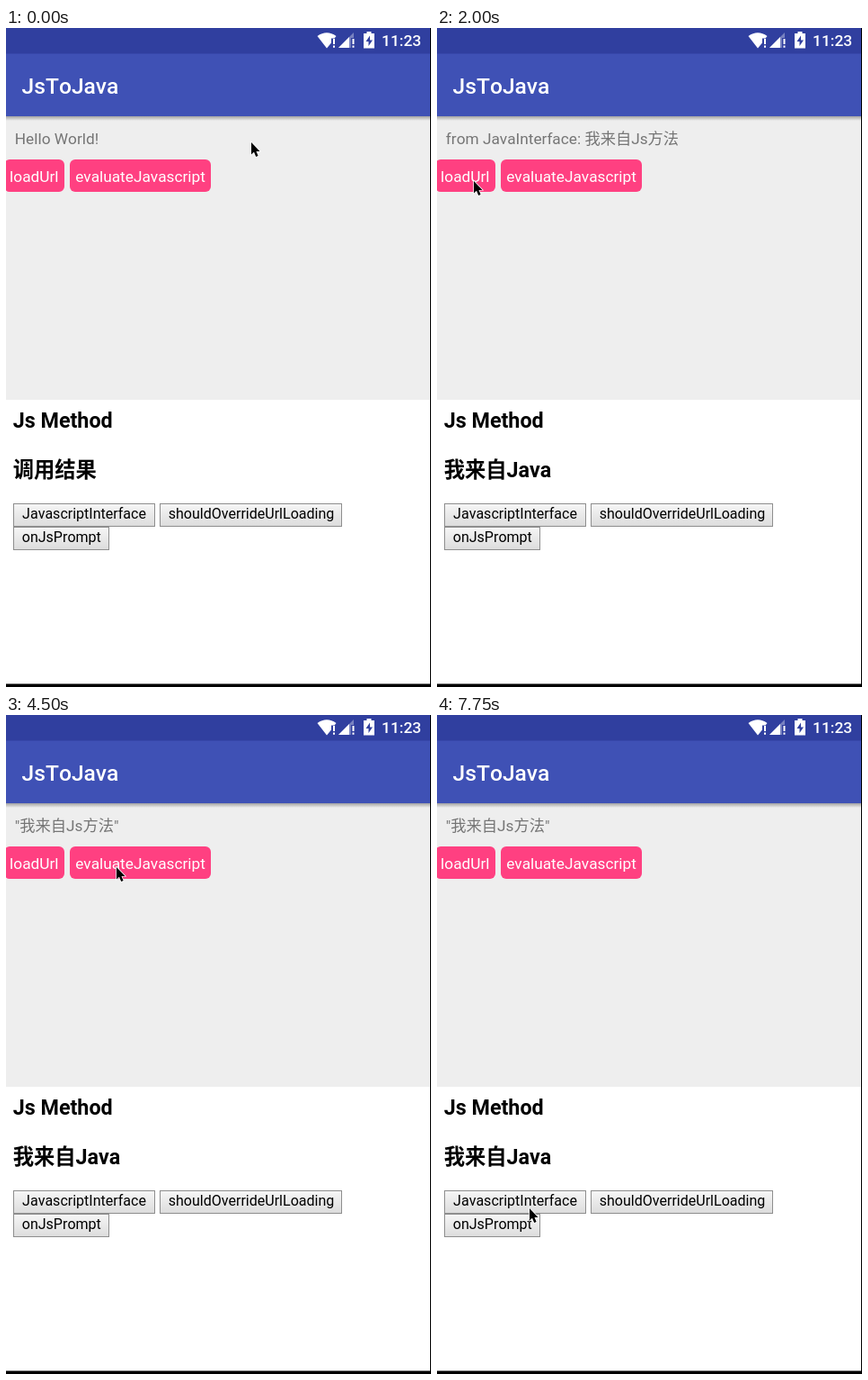
An HTML page that plays this animation: 473x732 px, repeating every 8 s.

```html
<!DOCTYPE html>
<html lang="zh-CN">
<head>
<meta charset="utf-8">
<title>JsToJava</title>
<style>
  html, body { margin: 0; width: 100%; height: 100%; overflow: hidden; background: #fff; }
  svg { display: block; font-family: Roboto, "Noto Sans CJK SC", "Noto Sans CJK", sans-serif; font-kerning: none; }
  .title { font-size: 24.6px; font-weight: 500; fill: #fff; }
  .clock { font-size: 17.4px; font-weight: 500; fill: #fff; }
  .label { font-size: 17.25px; fill: #757575; }
  .pink rect { fill: #ff4081; }
  .pink text { font-size: 17.25px; fill: #fff; text-anchor: middle; }
  .heading { font-size: 23.3px; font-weight: 700; }
  .web rect { fill: url(#face); stroke: #8e8e8e; }
  .web text { font-size: 16.05px; text-anchor: middle; }
</style>
</head>
<body>
<svg width="473" height="732" viewBox="0 0 473 732">
  <defs>
    <linearGradient id="face" x2="0" y2="1">
      <stop stop-color="#f6f6f6"/><stop offset="1" stop-color="#dcdcdc"/>
    </linearGradient>
    <linearGradient id="shade" x2="0" y2="1">
      <stop stop-color="#000" stop-opacity=".32"/><stop offset="1" stop-color="#000" stop-opacity="0"/>
    </linearGradient>
  </defs>

  <rect width="473" height="732" fill="#fff"/>
  <rect y="98" width="473" height="315" fill="#eee"/>
  <rect y="98" width="473" height="5" fill="url(#shade)"/>
  <rect width="473" height="98" fill="#3f51b5"/>
  <rect width="473" height="28.5" fill="#303f9f"/>

  <!-- status icons -->
  <g fill="#fff">
    <path d="M346.5 9Q357 1.5 367.5 9L365.500 11.5H362V16.5L357 22.5Z"/>
    <path d="M364 12h2v6h-2zM364 19.5h2v2.3h-2z"/>
    <path d="M370 22L387 5V11H384V22Z" opacity=".35"/>
    <path d="M370 22L382 10V22Z"/>
    <path d="M385.5 12h2v6h-2zM385.5 19.5h2v2.3h-2z"/>
    <path d="M401.5 4h5v2h3.500v16.5h-12V6h3.5z"/>
    <path d="M405 8.5L400.5 15h3V20L408 13.5h-3z" fill="#303f9f"/>
  </g>
  <text class="clock" x="418" y="20.3">11:23</text>
  <text class="title" x="17.6" y="73">JsToJava</text>

  <text class="label" id="label" x="9.8" y="129"></text>
  <g class="pink">
    <rect x="-2" y="146" width="67" height="36" rx="6"/>
    <text x="31.3" y="171">loadUrl</text>
    <rect x="71" y="146" width="157" height="36" rx="6"/>
    <text x="149.5" y="171">evaluateJavascript</text>
  </g>

  <text class="heading" x="7.7" y="444">Js Method</text>
  <text class="heading" id="result" x="7.7" y="498.5"></text>
  <g class="web">
    <rect x="8.5" y="528.5" width="157" height="25"/>
    <text x="87" y="545">JavascriptInterface</text>
    <rect x="171.5" y="528.5" width="202" height="25"/>
    <text x="273" y="545">shouldOverrideUrlLoading</text>
    <rect x="8.5" y="554.5" width="106" height="25"/>
    <text x="61.8" y="571">onJsPrompt</text>
  </g>

  <path d="M0 728.5H472V0H473V732H0Z"/>
  <path id="cursor" d="M0 0V13.5L3 10.800L5.200 16L7.600 15L5.500 9.900H9.500Z"
        stroke="#fff" stroke-width="1.4" paint-order="stroke"/>
</svg>
<script>
  const LOOP = 8000, STEP = 250;

  const easeIn = u => u ** 1.4;
  const easeOut = u => 1 - (1 - u) ** 3;
  const easeInOut = u => u * u * (3 - 2 * u);

  // each move glides the pointer on from where the last one ended
  const home = { x: 273, y: 127 };
  const moves = [
    { from: 100, to: 1000, x: 41, y: 170, ease: easeInOut },
    { from: 2750, to: 3500, x: 123, y: 169, ease: easeInOut },
    { from: 6000, to: 6500, x: 129, y: 324, ease: easeIn },
    { from: 6750, to: 7750, x: 103, y: 548, ease: easeOut }
  ];

  function pointer(t) {
    let { x, y } = home;
    for (const m of moves) {
      const u = Math.min(1, Math.max(0, (t - m.from) / (m.to - m.from)));
      const k = m.ease(u);
      x += (m.x - x) * k;
      y += (m.y - y) * k;
    }
    return `translate(${x} ${y})`;
  }

  function labelText(t) {
    if (t < 2000) return 'Hello World!';
    return t < 4500 ? 'from JavaInterface: 我来自Js方法' : '"我来自Js方法"';
  }

  const $ = id => document.getElementById(id);

  function draw(t) {
    // the screen is refreshed four times a second
    $('cursor').setAttribute('transform', pointer(Math.floor(t / STEP) * STEP));
    $('label').textContent = labelText(t);
    $('result').textContent = t < 2000 ? '调用结果' : '我来自Java';
  }

  const start = performance.now();
  function tick() {
    draw((performance.now() - start) % LOOP);
    requestAnimationFrame(tick);
  }
  tick();
</script>
</body>
</html>
```
